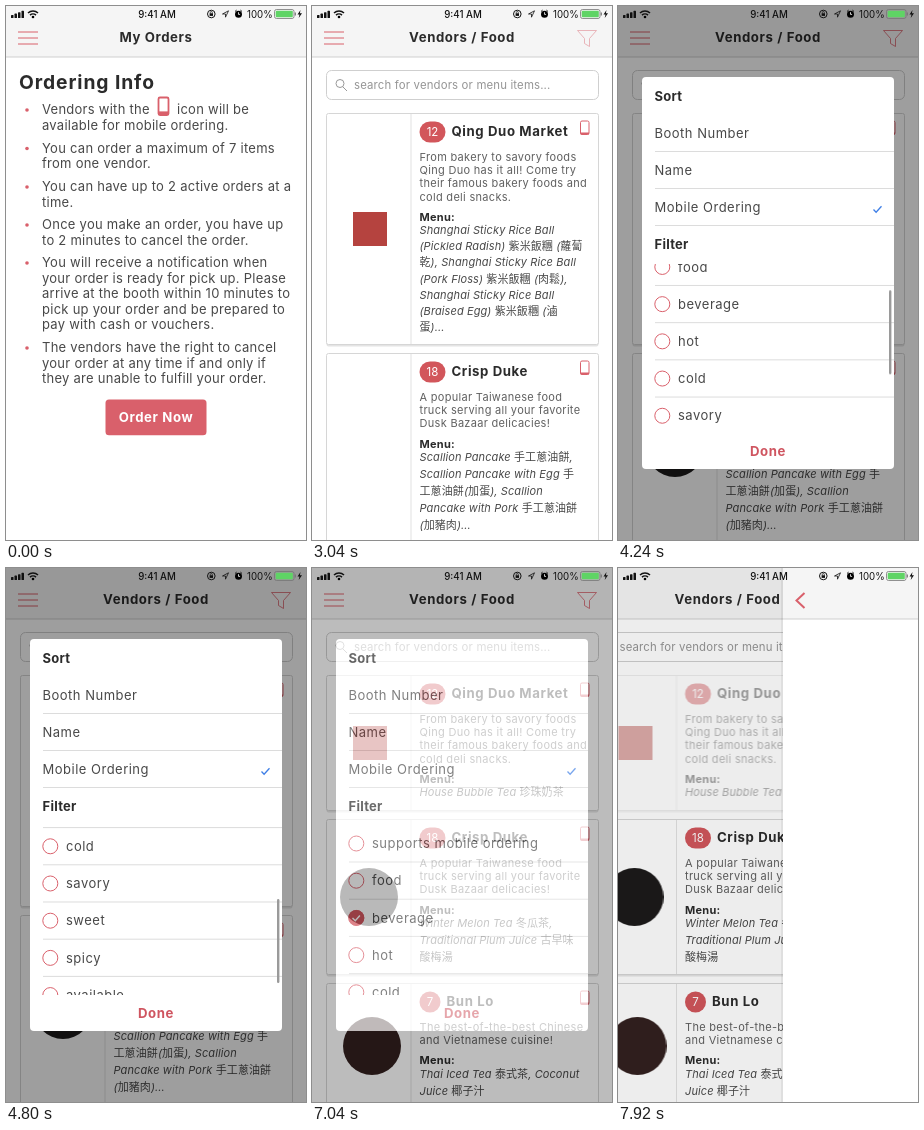
Write an HTML page that moves like this. It is 300x534 px and loops after 8000 ms.

```html
<!DOCTYPE html>
<html lang="en">
<head>
<meta charset="utf-8">
<title>Mobile ordering</title>
<style>
html, body { margin: 0; height: 100%; overflow: hidden; background: #fff; }
svg { display: block; width: 100vw; height: 100vh; }
text { font: 13px Inter, "Noto Sans CJK TC", "Noto Sans CJK SC", "Noto Sans CJK", sans-serif; letter-spacing: .26px; fill: #484848; white-space: pre; }
.row { letter-spacing: .5px; }
.bold { font-weight: 700; fill: #2b2b2b; }
.title { font-size: 13.2px; font-weight: 700; letter-spacing: .6px; fill: #2b2b2b; }
.mid { text-anchor: middle; }
.h1 { font-size: 19.3px; font-weight: 700; letter-spacing: .9px; fill: #2b2b2b; }
.small { font-size: 11px; letter-spacing: .3px; fill: #606060; }
.menu { font-size: 11px; font-weight: 700; fill: #2b2b2b; }
.dish { font-size: 11px; letter-spacing: .1px; font-style: italic; }
.cjk { font-style: normal; }
.hint { font-size: 11.4px; letter-spacing: .15px; fill: #959595; }
.white { fill: #fff; }
.badge { font-size: 11.5px; letter-spacing: 0; fill: #fff; text-anchor: middle; }
.clock { font-size: 9.7px; font-weight: 500; letter-spacing: 0; fill: #111; }
.thin { font-weight: 400; }
.line { fill: none; stroke: #d9606b; }

.anim { animation: 8s linear infinite; }
.hard { animation-timing-function: step-end; }
.info { animation-name: info; }
.press { animation-name: press; }
.loader { animation-name: loader; }
.all { animation-name: all; }
.logo { animation-name: logo; }
.late { animation-name: late; }
.drinks { animation-name: drinks; }
.funnel { animation-name: funnel; }
.modal { animation-name: modal; }
.scroll { animation-name: scroll; }
.bar { animation-name: bar, barFade; }
.picked { animation-name: picked; }
.done { animation-name: done; }
.tapped { animation-name: tapped; }
.under { animation-name: under; }
.dim { animation-name: dim; }
.panel { animation-name: panel; }
.spin { transform-origin: 149px 82px; animation: spin 1s steps(12) -250ms infinite; }

@keyframes info { 0% { visibility: visible } 18%, 100% { visibility: hidden } }
@keyframes press { 0%, 14.5% { opacity: 1 } 16.5%, 100% { opacity: .35 } }
@keyframes loader { 0% { visibility: visible } 28%, 100% { visibility: hidden } }
@keyframes all { 0% { visibility: hidden } 28% { visibility: visible } 79%, 100% { visibility: hidden } }
@keyframes logo { 0%, 28% { opacity: 0 } 33%, 100% { opacity: 1 } }
@keyframes late { 0%, 44.5% { opacity: 0 } 48%, 100% { opacity: 1 } }
@keyframes drinks { 0% { visibility: hidden } 79%, 100% { visibility: visible } }
@keyframes funnel { 0%, 36.5% { opacity: 1 } 39%, 44.5% { opacity: .25 } 47.5%, 100% { opacity: 1 } }
@keyframes modal {
  0%, 40.4% { opacity: 0; }
  45.6%, 87% { opacity: 1; }
  88% { opacity: .7; }
  91%, 100% { opacity: 0; }
}
@keyframes scroll {
  0%, 51% { transform: none; }
  54.5% { transform: translateY(-90px); animation-timing-function: ease-out; }
  60% { transform: translateY(-146px); }
  62%, 63% { transform: translateY(-148px); animation-timing-function: ease-in-out; }
  68%, 100% { transform: none; }
}
@keyframes bar {
  0%, 51% { transform: none; }
  54.5% { transform: translateY(44px); animation-timing-function: ease-out; }
  60% { transform: translateY(72px); }
  62%, 63% { transform: translateY(73px); animation-timing-function: ease-in-out; }
  68%, 100% { transform: none; }
}
@keyframes barFade { 0%, 50.5% { opacity: 0 } 52%, 70% { opacity: 1 } 73%, 100% { opacity: 0 } }
@keyframes picked { 0% { visibility: hidden } 77%, 100% { visibility: visible } }
@keyframes done { 0% { opacity: 1 } 86%, 100% { opacity: .75 } }
@keyframes tapped { 0%, 93% { opacity: 1 } 95%, 100% { opacity: .45 } }
@keyframes under { 0%, 97% { transform: none } 98% { transform: translateX(-18px) } 99%, 100% { transform: translateX(-40.5px) } }
@keyframes dim { 0%, 97% { opacity: 0 } 99%, 100% { opacity: .07 } }
@keyframes panel { 0%, 97% { transform: translateX(304px) } 98% { transform: translateX(240px) } 99%, 100% { transform: translateX(165px) } }
@keyframes spin { to { transform: rotate(360deg) } }
</style>
</head>
<body>
<svg id="stage" viewBox="0 0 300 534"></svg>
<script>
const RED = '#d9606b';
const text = (x, y, cls, s) => `<text x="${x}" y="${y}" class="${cls}">` +
  s.replace(/[\u4e00-\u9fff]+/g, '<tspan class="cjk">$&</tspan>') + '</text>';
const lines = (x, y, step, cls, rows) => rows.map((s, i) => text(x, y + i * step, cls, s)).join('');
const rect = (x, y, w, h, fill, more = '') =>
  `<rect x="${x}" y="${y}" width="${w}" height="${h}" fill="${fill}" ${more}/>`;
const path = (d, more = '') => `<path d="${d}" class="line" ${more}/>`;

const header = (title, extra = '') => rect(0, 0, 300, 51, '#f5f5f5') + rect(0, 50.5, 300, 1, '#cfcfcf') +
  text(150, 36.3, 'title mid', title) + extra;
const burger = path('M12 26h20M12 32h20M12 38h20');
const phone = (x, y, w, h, line) => rect(x, y, w, h, 'none', `rx="1.5" stroke="${RED}" stroke-width="${line}"`) +
  rect(x, y + h - 2 * line, w, 2 * line, RED);

const rules = [
  [108, ['', 'available for mobile ordering.']],
  [146.5, ['You can order a maximum of 7 items', 'from one vendor.']],
  [185, ['You can have up to 2 active orders at a', 'time.']],
  [223, ['Once you make an order, you have up', 'to 2 minutes to cancel the order.']],
  [261, ['You will receive a notification when', 'your order is ready for pick up. Please',
    'arrive at the booth within 10 minutes to', 'pick up your order and be prepared to',
    'pay with cash or vouchers.']],
  [346, ['The vendors have the right to cancel', 'your order at any time if and only if',
    'they are unable to fulfill your order.']]
];

const infoPage = `<g class="anim hard info">${rect(0, 0, 300, 534, '#fff')}${header('My Orders', burger)}
  ${text(13, 82.7, 'h1', 'Ordering Info')}
  ${text(36, 108, '', 'Vendors with the')}${phone(152.5, 91.5, 10, 17.5, 1.8)}${text(171, 108, '', 'icon will be')}
  ${rules.map(([y, rows]) => `<circle cx="21" cy="${y - 4}" r="1.8" fill="${RED}"/>` + lines(36, y, 15.6, '', rows)).join('')}
  <g class="anim press">${rect(99.5, 393.5, 101, 35.7, RED, 'rx="3.5"')}${text(150, 416, 'title mid white', 'Order Now')}</g></g>`;

const blades = Array.from({ length: 12 }, (_, i) =>
  path('M149 75.5v-6', `stroke-width="2.2" stroke-linecap="round" style="stroke:#b8474f"
    opacity="${i ? .22 + .05 * i : 1}" transform="rotate(${i * 30} 149 82)"`)).join('');

const square = cy => rect(41, cy - 17, 34, 34, '#b5433f');
const disc = (cx, r, fill) => cy => `<circle cx="${cx}" cy="${cy}" r="${r}" fill="${fill}"/>`;

const vendors = [
  { no: 12, name: 'Qing Duo Market', mark: square, about: ['From bakery to savory foods',
    'Qing Duo has it all! Come try', 'their famous bakery foods and', 'cold deli snacks.'] },
  { no: 18, name: 'Crisp Duke', mark: disc(57, 29, '#1c1a1a'), load: 'late', about: ['A popular Taiwanese food',
    'truck serving all your favorite', 'Dusk Bazaar delicacies!'] },
  { no: 7, name: 'Bun Lo', mark: disc(60, 29, '#33201f'), about: ['The best-of-the-best Chinese',
    'and Vietnamese cuisine!'] }
];

function card(v, y, h, dishes, cls = '') {
  const w = v.no > 9 ? 26 : 21;
  const menu = y + 55 + 13.2 * v.about.length;
  const first = menu + 13.3;
  const step = (y + h - 14 - first) / Math.max(1, dishes.length - 1);
  return `<g class="${cls}">` +
    rect(14.5, y + 1.5, 272, h, '#e4e4e4', 'rx="2"') +
    rect(14.5, y + .5, 272, h - 1, '#fff', 'rx="2" stroke="#d6d6d6"') +
    rect(98.5, y + 1, 1, h - 2, '#e2e2e2') +
    `<g class="anim ${v.load || 'logo'}">${v.mark(y + h / 2)}</g>` +
    rect(107.5, y + 8.5, w, 21, '#d2565b', 'rx="10.5"') +
    text(107.5 + w / 2, y + 23.2, 'badge', String(v.no)) +
    text(113.5 + w, y + 23, 'title', v.name) + phone(268.5, y + 8, 8.5, 13.5, 1) +
    lines(107.5, y + 48, 13.2, 'small', v.about) +
    text(107.5, menu, 'menu', 'Menu:') + lines(107.5, first, step, 'dish', dishes) + '</g>';
}

const search = rect(14.5, 64.5, 272, 29, '#fff', 'rx="5" stroke="#cfcfcf"') +
  path('M31 81l4 4', 'style="stroke:#999"') +
  '<circle cx="28" cy="77.5" r="4" fill="none" stroke="#999"/>' +
  text(42, 83, 'hint', 'search for vendors or menu items...');

const ball = 'Shanghai Sticky Rice Ball';
const allList = search +
  card(vendors[0], 107, 232, [ball, '(Pickled Radish) 紫米飯糰 (蘿蔔', '乾), ' + ball,
    '(Pork Floss) 紫米飯糰 (肉鬆),', ball, '(Braised Egg) 紫米飯糰 (滷', '蛋)...']) +
  card(vendors[1], 347, 190, ['Scallion Pancake 手工蔥油餅,', 'Scallion Pancake with Egg 手',
    '工蔥油餅(加蛋), Scallion', 'Pancake with Pork 手工蔥油餅', '(加豬肉)...']);
const drinkList = search +
  card(vendors[0], 107, 136, ['House Bubble Tea 珍珠奶茶'], 'anim tapped') +
  card(vendors[1], 251, 156, ['Winter Melon Tea 冬瓜茶,', 'Traditional Plum Juice 古早味', '酸梅湯']) +
  card(vendors[2], 415, 126, ['Thai Iced Tea 泰式茶, Coconut', 'Juice 椰子汁']);

const funnel = `<g class="anim funnel">${path('M265.5 24.5H284.5L277.5 32.5V40.5L272.5 37.5V32.5Z', 'stroke-width=".8"')}</g>`;
const vendorPage = `<g class="anim under">${rect(0, 0, 300, 534, '#fff')}
  <g class="anim hard loader"><g class="spin">${blades}</g></g>
  <g class="anim hard all">${allList}</g>
  <g class="anim hard drinks">${drinkList}</g>
  ${header('Vendors / Food', burger + funnel)}</g>`;

const filters = ['supports mobile ordering', 'food', 'beverage', 'hot', 'cold', 'savory', 'sweet', 'spicy', 'available'];
const ROW = 37.2;
const filterRows = filters.map((s, i) => {
  const y = 275.5 + i * ROW;
  return `<circle cx="44.3" cy="${y}" r="7.5" class="line"/>` + text(60, y + 4.7, 'row', s) +
    rect(37, y + 18, 239, 1, '#dcdcdc');
}).join('');
const pickedY = 275.5 + 2 * ROW;
const picked = `<g class="anim hard picked"><circle cx="44.3" cy="${pickedY}" r="8" fill="#cf4f57"/>
  ${path(`M40.5 ${pickedY}l2.8 2.8 4.6-5.2`, 'style="stroke:#fff" stroke-width="1.4"')}</g>`;

const modal = `<g class="anim modal">${rect(0, 0, 300, 534, '#000', 'opacity=".38"')}
  ${rect(24, 71, 252, 392, '#fff', 'rx="4"')}
  ${text(36.5, 94.5, 'bold', 'Sort')}${lines(36.5, 131.5, ROW, 'row', ['Booth Number', 'Name', 'Mobile Ordering'])}
  ${[145, 182, 219].map(y => rect(37, y, 239, 1, '#dcdcdc')).join('')}
  ${path('M255.5 203.5l2.6 2.8 5.4-6', 'style="stroke:#3f7fe6" stroke-width="1.3"')}
  ${text(36.5, 243, 'bold', 'Filter')}
  <g clip-path="url(#list)"><g class="anim scroll">${filterRows}${picked}</g></g>
  ${rect(271, 259, 2.4, 84, '#9a9a9a', 'rx="1.2" class="anim bar"')}
  <g class="anim hard done"><text x="150" y="450" class="title mid" style="fill:#cf5560">Done</text></g></g>`;

const panel = `<g class="anim panel">${rect(-2, 0, 2, 534, '#000', 'opacity=".06"')}
  ${rect(0, 0, 300, 534, '#fff')}${header('')}${path('M21.5 25L13.5 32.5L21.5 40', 'stroke-width="2"')}</g>`;

const ink = 'style="stroke:#111"';
const status = [0, 1, 2, 3].map(i => rect(5 + i * 3.5, 9 - i * 1.4, 2.5, 3 + i * 1.4, '#111', 'rx=".6"')).join('') +
  path('M22 7a7.3 7.3 0 0 1 10 0M24 9.1a4.4 4.4 0 0 1 6 0', ink + ' stroke-width="1.5"') +
  '<circle cx="27" cy="11" r="1.3"/>' + text(151, 11.7, 'clock mid', '9:41 AM') +
  `<circle cx="205.3" cy="8" r="3.8" class="line" ${ink}/>` + rect(203.6, 7.3, 3.4, 2.6, '#111') +
  path('M204.3 7.5v-1a1 1 0 0 1 2 0v1', ink + ' stroke-width=".7"') +
  path('M222.5 4.8L216.5 8h3v3.2z', ink + ' stroke-width=".8"') +
  '<circle cx="232.5" cy="8.2" r="3.5"/>' + path('M229 5.5l1.6-1.4M236 5.5l-1.6-1.4', ink) +
  path('M232.5 6.2v2.2h1.6', 'style="stroke:#fff" stroke-width=".8"') +
  text(241, 11.7, 'clock thin', '100%') +
  rect(268.5, 3.5, 19.5, 9, 'none', 'rx="2" stroke="#777" stroke-width=".8"') +
  rect(269.7, 4.7, 17.1, 6.6, '#5fd465', 'rx="1"') + rect(288.7, 6.5, 1.2, 3, '#777') +
  '<path d="M294.5 4l-3 4.6h2l-.8 3.4 3.3-4.8h-2.1z" fill="#111"/>';

document.getElementById('stage').innerHTML =
  `<defs><clipPath id="list">${rect(24, 258, 252, 169, '#000')}</clipPath></defs>` +
  vendorPage + infoPage + rect(0, 0, 300, 534, '#000', 'class="anim dim"') + modal + panel + status;
</script>
</body>
</html>
```
